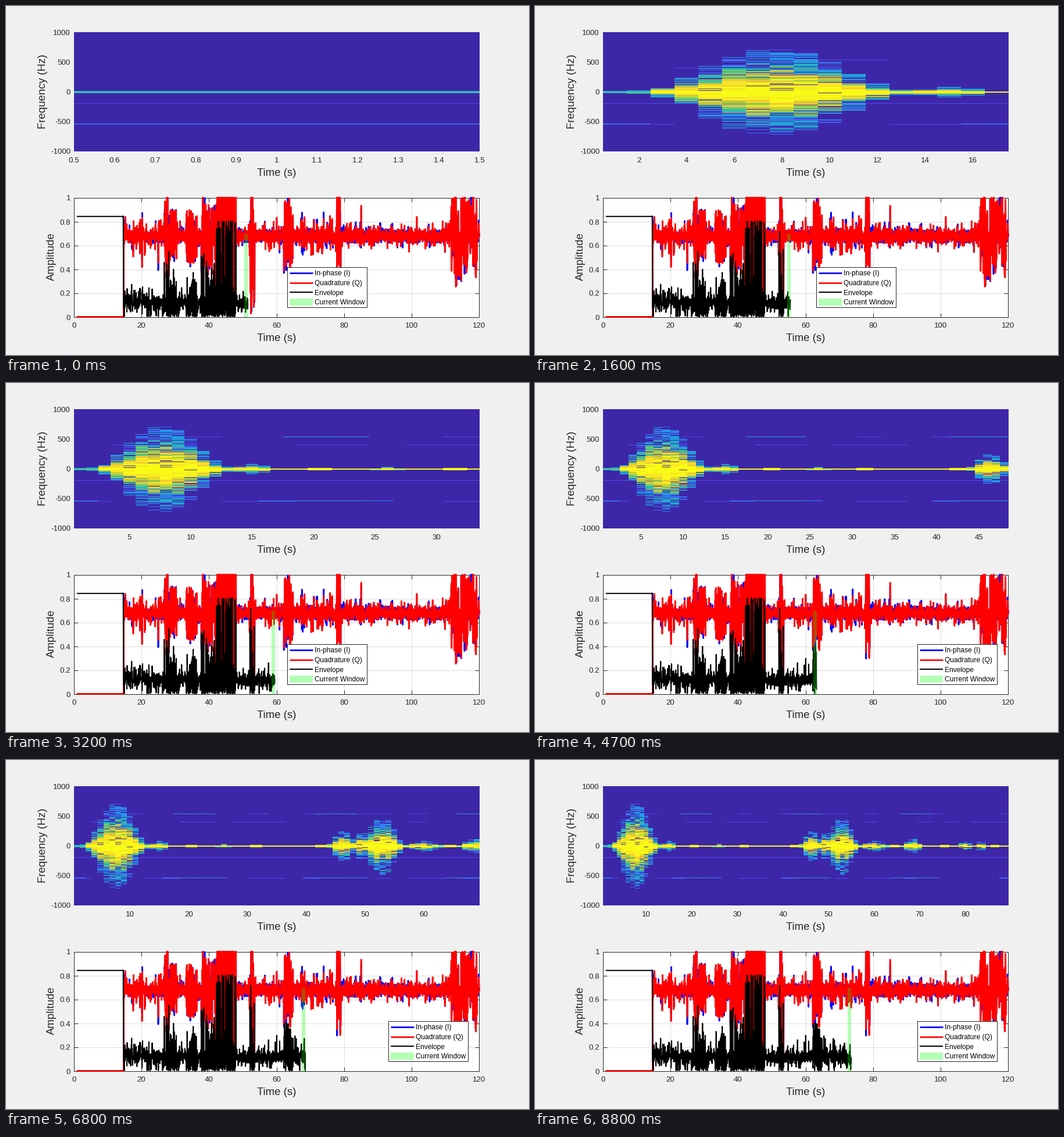
These frames come from a looping animation (900x600 px, 8900 ms). A matplotlib script:

```python
import math

import matplotlib.pyplot as plt
import numpy as np
from matplotlib.animation import FuncAnimation
from matplotlib.colors import LinearSegmentedColormap
from matplotlib.patches import Rectangle

W, H, DPI = 900, 600, 96
FRAMES, INTERVAL = 89, 100
INK = "#262626"
BLUE, RED, BLACK = "#0000ff", "#ff0000", "#000000"
PX = 72 / DPI  # points per pixel

plt.rcParams["font.family"] = "Liberation Sans"
plt.rcParams["axes.unicode_minus"] = False

PARULA = LinearSegmentedColormap.from_list("parula_like", [
    "#3e26a8", "#4852f4", "#2e87f7", "#12b1d6", "#37c897",
    "#abc739", "#fec338", "#f5e327", "#f9fb15"])

# ---------------------------------------------------------------- signals
START, DT, MID = 14.75, 0.04, .68
t = np.arange(START, 120.001, DT)

# centre, half width, reach
EVENTS = [(27.4, .8, .42), (29.3, 1.2, .24), (34.8, 1.6, .23), (38.5, .8, .42),
          (40.7, 1.5, .33), (45, 3, .8), (52.8, .7, .7), (63.5, 1.4, .32),
          (78.4, .6, .45), (112.6, .9, .46), (116.3, 3, .34)]
EVENTS += [(c, .06, .26) for c in (20.2, 25, 60, 68.5, 75.5, 85, 101.5)]


def swings(rng):
    """Signed excursions: rare in quiet parts, frequent during events."""
    reach = .12 + .04 * np.cos((t - 15) * 2 * np.pi / 54)
    power = np.full(t.size, 7.0)
    for centre, half, size in EVENTS:
        near = np.abs(t - centre) <= half
        reach[near] = np.maximum(reach[near], size)
        power[near] = 1.6
    sign = rng.choice((-1, 1), t.size)
    return sign * reach * rng.random(t.size) ** power


def grain(rng, size):
    return size * np.clip(rng.normal(size=t.size), -2.2, 2.2)


def with_lead(lead, v, lo, hi):
    lead_t, lead_v = zip(*lead)
    return np.r_[lead_t, t], np.r_[lead_v, np.clip(v, lo, hi)]


rng = np.random.default_rng(8)
iq = swings(rng)
q_sig = with_lead([(1, .003), (14.7, .003)],
                  MID + iq + grain(rng, .027), .03, 1.003)
i_sig = with_lead([(14.6, .845), (14.65, .845), (14.72, .1)],
                  MID + iq * rng.uniform(.6, 1.15, t.size) + grain(rng, .025),
                  .03, 1.003)
env = swings(rng)
env = np.where(env > 0, env, np.maximum(env, -.1))
e_sig = with_lead([(1, .845), (14.6, .845), (14.65, .12)],
                  .122 + env + grain(rng, .026), .006, .805)

# ------------------------------------------------------------ spectrogram
ROWS = 205
# centre column, width in columns, half height in rows
BURSTS = [(7.7, 3.6, 73), (15, 1.5, 9), (26, 1.2, 4), (46.3, 1.9, 25),
          (49.4, 1.6, 24), (52.9, 2.7, 50), (60, 3, 9), (68.5, 2, 12),
          (80, 1.3, 9), (83.5, 1, 8)]


def spectrogram():
    rng = np.random.default_rng(21)
    img = np.zeros((ROWS, FRAMES))
    cols = np.arange(1, FRAMES + 1)

    # constant, pulsing and scattered faint tones
    img[122] = .11
    for row in (47, 61, 158):
        runs = np.repeat(rng.random(FRAMES // 3 + 1) < .35, 3)[:FRAMES]
        img[row] = .11 * runs
    wave = .2 + .13 * np.cos((cols - 21) * 2 * np.pi / 24)
    for row, limit in ((47, .27), (157, .23)):
        img[row] = np.where(wave > limit, wave, img[row])

    # bursts fade from a full core to a ragged blue skirt
    d = np.abs(np.arange(ROWS) - 102.5)
    for c in cols:
        full = max(h * math.exp(-abs((c - m) / w) ** 2.5)
                   for m, w, h in BURSTS)
        if full < 2:
            continue
        s = d / full
        level = np.maximum(1.2 - 1.4 * s, .2) + rng.uniform(-.26, .26, ROWS)
        on = (s <= 1) & (rng.random(ROWS) > .3 * s) & (level > .08)
        img[on, c - 1] = np.clip(level, 0, 1)[on]

    # carrier line around 0 Hz
    early = cols < 3
    thick = (cols > 16) & (np.cos((cols - 20.5) * 2 * np.pi / 11) > .8)
    img[102:104] = np.where(early, .52, 1)
    rim = np.where(early, .33, np.where(thick, 1, 0))
    img[101:105:3] = np.maximum(img[101:105:3], rim)
    return img


spec = spectrogram()

# ----------------------------------------------------------------- figure
fig = plt.figure(figsize=(W / DPI, H / DPI), dpi=DPI, facecolor="#f0f0f0")


def box(x, y, w, h):
    return [x / W, 1 - (y + h) / H, w / W, h / H]


def label(x, y, text, rotation=0):
    fig.text(x / W, 1 - y / H, text, fontsize=14, color=INK, ha="center",
             va="center", rotation=rotation)


label(466, 287.5, "Time (s)")
label(466, 571.5, "Time (s)")
label(63.5, 147, "Frequency (Hz)", 90)
label(78.5, 431, "Amplitude", 90)

top = fig.add_axes(box(117, 45, 698, 205))
image = top.imshow(spec[:, :1], cmap=PARULA, vmin=0, vmax=1, aspect="auto",
                   interpolation="nearest", extent=(.5, 1.5, -1000, 1000))
top.spines[:].set_visible(False)
top.tick_params(length=0, labelsize=10, labelcolor=INK)
top.tick_params(axis="x", pad=10 * PX)
top.tick_params(axis="y", pad=6 * PX)
top.set_yticks(range(-1000, 1001, 500))

low = fig.add_axes(box(117, 330, 697.4, 205))
low.set_xlim(0, 120)
low.set_ylim(0, 1)
low.set_xticks(range(0, 121, 20))
low.set_yticks(np.arange(6) / 5, [f"{k / 5:g}" for k in range(6)])
low.set_axisbelow(True)
low.grid(color=INK, alpha=.15, linewidth=PX)
low.tick_params(direction="in", length=7 * PX, width=PX, color=INK,
                labelsize=10, labelcolor=INK, top=True, right=True)
low.tick_params(axis="x", pad=9 * PX)
low.tick_params(axis="y", pad=6 * PX)
low.spines[:].set(color=INK, linewidth=PX, zorder=1)

low.plot(*i_sig, color=BLUE, linewidth=2, clip_on=False)
low.plot(*q_sig, color=RED, linewidth=2, clip_on=False)
envelope, = low.plot([], [], color=BLACK, linewidth=1.5, clip_on=False)
window = low.add_patch(Rectangle((50.5, 0), 1, .7, facecolor="#00ff00",
                                 alpha=.3, linewidth=0, zorder=5))

LEG_Y, LEG_W, LEG_H = 449, 137, 69
legend = fig.add_axes(box(484, LEG_Y, LEG_W, LEG_H), zorder=10)
legend.set_xlim(0, LEG_W)
legend.set_ylim(LEG_H, 0)
legend.set_xticks([])
legend.set_yticks([])
legend.spines[:].set(color=INK, linewidth=PX)
for k, (name, color, width) in enumerate([("In-phase (I)", BLUE, 2),
                                          ("Quadrature (Q)", RED, 2),
                                          ("Envelope", BLACK, 1.5),
                                          ("Current Window", None, 0)]):
    y = 10 + 16.5 * k
    if color:
        legend.plot([4, 44], [y, y], color=color, linewidth=width,
                    solid_capstyle="butt")
    else:
        legend.add_patch(Rectangle((4, y - 6), 40, 12, linewidth=0,
                                   facecolor="#b2ffb2"))
    legend.text(47, y, name, fontsize=9, color=BLACK, va="center_baseline")


def time_ticks(n):
    step = next(s for s in (.1, .2, .5, 1, 2, 5, 10) if n / s <= 10 + 1e-6)
    first = math.ceil(.5 / step - 1e-9)
    last = math.floor((n + .5) / step + 1e-9)
    return [round(k * step, 3) for k in range(first, last + 1)]


def draw(i):
    n = i + 1
    image.set_data(spec[:, :n])
    image.set_extent((.5, n + .5, -1000, 1000))
    top.set_xlim(.5, n + .5)
    ticks = time_ticks(n)
    top.set_xticks(ticks, [f"{x:g}" for x in ticks])

    start = 50.5 + i / 4
    window.set_x(start)
    seen = e_sig[0] <= start + 1
    envelope.set_data(e_sig[0][seen], e_sig[1][seen])

    # the legend steps aside once the envelope reaches it
    left = 484 if start + 1 < 63.2 else 658
    legend.set_position(box(left, LEG_Y, LEG_W, LEG_H))
    return image, window, envelope


anim = FuncAnimation(fig, draw, frames=FRAMES, interval=INTERVAL, repeat=True,
                     repeat_delay=0, blit=False)
plt.show()
```
